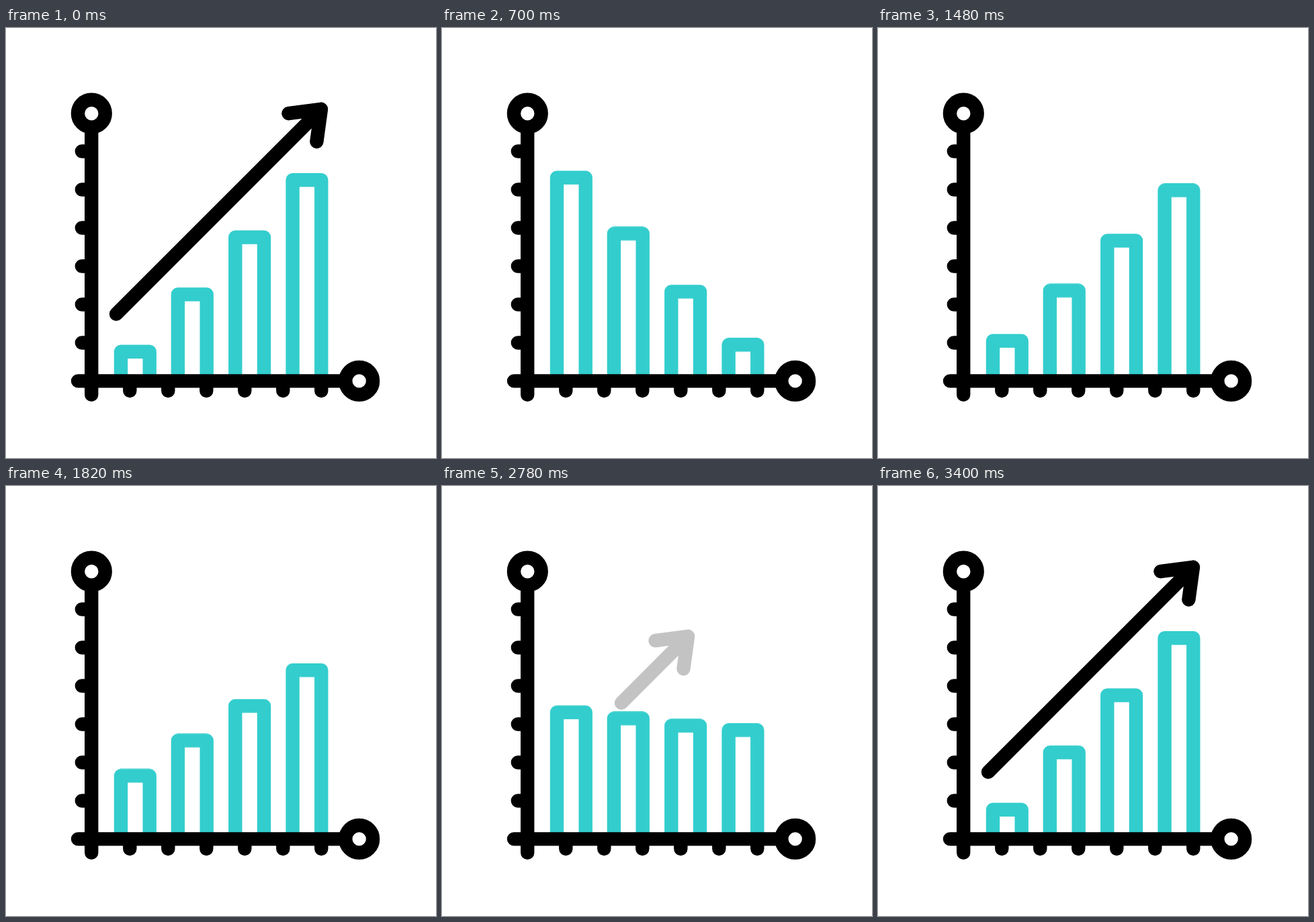
Write an HTML page that moves like this. It is 640 px wide and 640 px high and loops after 3620 ms.

```html
<!DOCTYPE html>
<html lang="en">
<head>
<meta charset="utf-8">
<title>Growth chart</title>
<style>
  html, body { margin: 0; width: 100%; height: 100%; overflow: hidden; background: #fff; }
  svg { display: block; width: 100%; height: 100%; }

  svg {
    --loop: 3620ms;
    --ease: cubic-bezier(.3333, 0, .6667, 1);
    fill: none;
    stroke: #000;
    stroke-width: 20.4;
    stroke-linecap: round;
    stroke-linejoin: round;
  }

  .bars { stroke: #33cdcd; }
  .bars path { animation: swing var(--loop) var(--ease) infinite; }

  .arrow {
    animation:
      fly var(--loop) var(--ease) infinite,
      grow var(--loop) var(--ease) infinite,
      fade var(--loop) var(--ease) infinite;
  }

  /* 800 ms per half swing */
  @keyframes swing {
    0%, 44.1989%, 88.3978%, 100% { transform: translateY(0); }
    22.0994%, 66.2983% { transform: translateY(var(--d)); }
  }

  @keyframes fly {
    0% { transform: translate(0, 0); }
    22.0994% { transform: translate(520px, -520px); animation-timing-function: step-end; }
    44.1989%, 100% { transform: translate(0, 0); }
  }

  /* the shaft opens from its middle, the head keeps its size */
  @keyframes grow {
    0%, 93.9227%, 100% { d: path("M164 425.8L469 120.8M420.5 127.2L469 120.8L462.4 169.2"); }
    22.0994% {
      d: path("M164 425.8L469 120.8M420.5 127.2L469 120.8L462.4 169.2");
      animation-timing-function: step-end;
    }
    44.1989%, 66.2983% { d: path("M316.5 273.3L316.5 273.3M268 279.7L316.5 273.3L309.9 321.7"); }
  }

  @keyframes fade {
    0%, 93.9227%, 100% { opacity: 1; }
    22.0994% { opacity: 1; animation-timing-function: step-end; }
    22.1%, 69.0608% { opacity: 0; }
  }
</style>
</head>
<body>
<svg viewBox="0 0 640 640">
  <defs>
    <clipPath id="above"><rect width="640" height="525"/></clipPath>
  </defs>

  <g class="bars" clip-path="url(#above)">
    <path style="--d:-270.5px" d="M171 900V481.7h42.7V900"/>
    <path style="--d:-94.5px" d="M255.9 900V396.5h42.8V900"/>
    <path style="--d:84.4px" d="M341.3 900V311.5h42.7V900"/>
    <path style="--d:256px" d="M426.6 900V226.2h42.7V900"/>
  </g>

  <path class="arrow" d="M164 425.8L469 120.8M420.5 127.2L469 120.8L462.4 169.2"/>

  <g class="axes">
    <path d="M127.2 148V545.8M107 525.4H505"/>
    <path d="M112.8 183.5h14m-14 57h14m-14 57h14m-14 57h14m-14 57h14m-14 57h14"/>
    <path d="M184.3 540v-14m57 14v-14m57 14v-14m57 14v-14m57 14v-14m57 14v-14"/>
    <circle cx="127.3" cy="127.2" r="20.4" fill="#fff"/>
    <circle cx="525.7" cy="525.4" r="20.4" fill="#fff"/>
  </g>
</svg>
</body>
</html>
```
